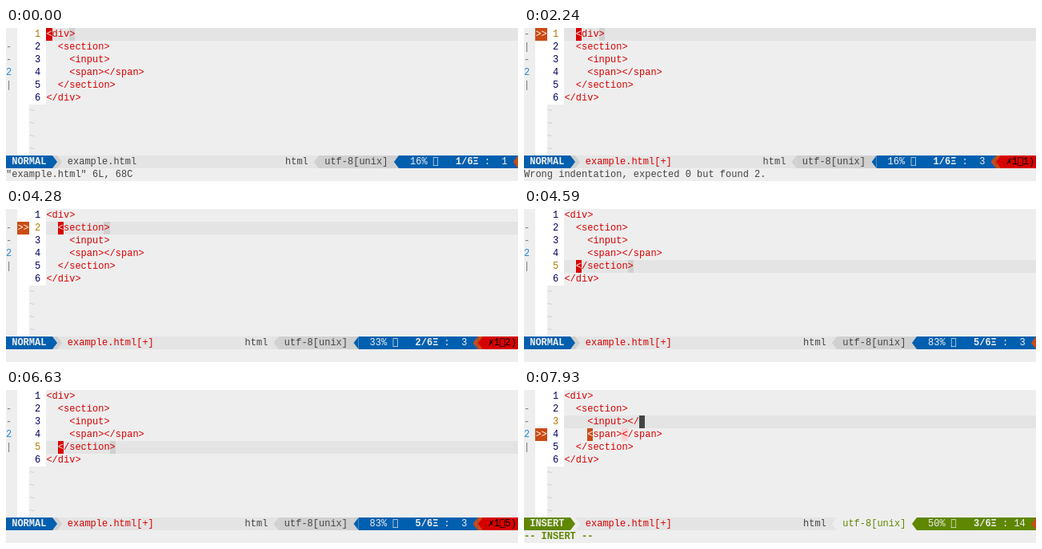
Write an HTML page that moves like this. It is 640x192 px and loops after 7.99 s.

```html
<!DOCTYPE html>
<html lang="en">
<head>
<meta charset="utf-8">
<title>Editor with live markup checks</title>
<style>
  html, body { margin: 0; width: 100%; height: 100%; overflow: hidden; background: #eee; }
  svg { display: block; width: 640px; height: 192px; }
  rect, path { shape-rendering: crispEdges; }
  text { font: 12px "Liberation Mono", "DejaVu Sans Mono", monospace; white-space: pre; }
  .b { font-weight: 700; }
  .s { font-family: "DejaVu Sans Mono", monospace; }
</style>
</head>
<body>
<svg id="screen" viewBox="0 0 640 192"></svg>
<script>
const LOOP = 7990, CW = 7.2, RH = 16, LEFT = 50.4, BAR = 160;
const RED = '#d70000', BLUE = '#005faf', GREEN = '#5f8700', ORANGE = '#cb4b16';
const INK = '#444', PAPER = '#eee', LINE = '#e4e4e4', GREY = '#d0d0d0';

const doc = ['<div>', '  <section>', '    <input>', '    <span></span>', '  </section>', '</div>'];
const edit = (row, text) => doc.map((l, i) => i === row - 1 ? text : l);
const cut = doc.filter((l, i) => i !== 4);

// Each step changes some of the editor's state from its time on.
const steps = [
  [0, { lines: doc, row: 1, col: 1, changed: false, signs: [], marks: [], err: '', msg: '"example.html" 6L, 68C', typing: false, green: false }],
  [1310, { lines: edit(1, '  <div>'), col: 3, changed: true }],
  [1440, { msg: '' }],
  [2240, { signs: [1], err: '11', msg: 'Wrong indentation, expected 0 but found 2.' }],
  [2300, { lines: doc, col: 1, msg: '' }],
  [2400, { row: 2, signs: [], err: '' }],
  [2490, { lines: edit(2, '<section>') }],
  [3090, { signs: [2] }],
  [3220, { msg: 'Wrong indentation, expected 2 but found 0.' }],
  [4220, { lines: doc, col: 3, err: '12', msg: '' }],
  [4290, { signs: [], err: '' }],
  [4370, { row: 3 }],
  [4450, { row: 4 }],
  [4520, { row: 5 }],
  [4780, { lines: cut, col: 1 }],
  [4910, { row: 2, col: 3 }],
  [5700, { signs: [2, 5], marks: [[5, 1, 'soft']], err: '32', msg: 'Unclosed element for <section> detected.' }],
  [6030, { lines: doc, row: 5, signs: [2], marks: [], err: '15', msg: '' }],
  [6630, { signs: [] }],
  [6760, { err: '' }],
  [6890, { row: 4 }],
  [7090, { col: 5 }],
  [7350, { row: 3 }],
  [7445, { col: 12, typing: true }],
  [7540, { green: true }],
  [7800, { lines: edit(3, '    <input><'), col: 13, signs: [4], marks: [[4, 5, 'hard'], [4, 11, 'soft']] }],
  [7930, { lines: edit(3, '    <input></'), col: 14 }]
];

const esc = s => s.replace(/&/g, '&amp;').replace(/</g, '&lt;');
const colX = c => LEFT + (c - 1) * CW;

function box(x, y, w, h, fill) {
  const a = Math.round(x), b = Math.round(x + w);
  return `<rect x="${a}" y="${y}" width="${b - a}" height="${h}" fill="${fill}"/>`;
}
function text(x, y, s, fill, cls = '') {
  return s ? `<text x="${x.toFixed(1)}" y="${y + 11}" fill="${fill}" class="${cls}">${esc(s)}</text>` : '';
}
// A status bar divider with its tip at x + w.
function tip(x, w, fill) {
  return `<path d="M${x} ${BAR}l${w} 8l${-w} 8z" fill="${fill}" style="shape-rendering:auto"/>`;
}
function cell(row, col, ch, bg, fg) {
  const y = (row - 1) * RH;
  return box(colX(col), y, CW, RH, bg) + text(colX(col), y, ch, fg);
}

function foldMark(lines, i) {
  const level = n => n < 0 ? 0 : lines[n].search(/\S/) / 2;
  const now = level(i);
  if (now > level(i - 1)) return '-';
  return now === 0 ? '' : now === 1 ? '|' : String(now);
}

function drawText(s) {
  const n = s.lines.length;
  let out = box(14, 0, 15, BAR, '#fff') + box(29, 0, 21, n * RH, '#fff');
  out += box(50, (s.row - 1) * RH, 590, RH, LINE);
  s.lines.forEach((line, i) => {
    const y = i * RH, fold = foldMark(s.lines, i);
    out += text(0, y, fold, fold === '2' ? '#268bd2' : '#767676');
    out += text(36, y, String(i + 1), i + 1 === s.row ? '#af7800' : '#00005f');
    out += text(LEFT, y, line, RED);
  });
  for (let i = n; i < 10; i++) out += text(28.8, i * RH, '~', GREY);
  for (const r of s.signs) {
    out += box(14, (r - 1) * RH, 15, RH, ORANGE) + text(14.4, (r - 1) * RH, '>>', '#fdf6e3');
  }
  for (const [r, c, kind] of s.marks) {
    const ch = s.lines[r - 1][c - 1];
    out += kind === 'hard' ? cell(r, c, ch, ORANGE, '#fdf6e3') : cell(r, c, ch, '#ffd0d0', RED);
  }
  const line = s.lines[s.row - 1], ch = line[s.col - 1] || ' ';
  if (ch === '<') {
    const end = line.indexOf('>', s.col);
    if (end >= 0) out += cell(s.row, end + 1, '>', GREY, RED);
  }
  return out + cell(s.row, s.col, ch, ch === ' ' ? INK : RED, PAPER);
}

function drawBar(s) {
  const main = s.green ? GREEN : BLUE, side = s.green ? PAPER : GREY;
  const n = s.lines.length, d = s.err ? -50.4 : 0;
  const put = (x, str, fill, cls) => text(x + d, BAR, str, fill, cls);
  let out = box(0, BAR, 640, RH, LINE);
  out += box(58, BAR, 6, RH, side) + tip(64, 6, side);
  out += box(0, BAR, 58, RH, main) + tip(58, 6, main);
  out += text(7.2, BAR, s.green ? 'INSERT' : 'NORMAL', PAPER, 'b');
  out += text(76.8, BAR, 'example.html' + (s.changed ? '[+]' : ''), s.changed ? RED : INK);

  out += put(349, 'html', INK);
  out += tip(391 + d, -6, side) + box(391 + d, BAR, 100, RH, side);
  out += put(398.2, 'utf-8[unix]', s.green ? GREEN : INK);
  out += tip(491 + d, -6, main) + box(491 + d, BAR, 149 - d, RH, main);
  const pct = Math.floor(100 * s.row / n) + '%';
  out += put(526.6 - pct.length * CW, pct, PAPER) + put(533.6, '\ue0a1', PAPER, 's');
  out += put(562, `${s.row}/${n}Ξ`, PAPER, 'b');
  out += put(598, ':' + String(s.col).padStart(3), PAPER);
  out += tip(640 + d, -6, ORANGE);
  if (s.err) {
    out += box(590, BAR, 6, RH, ORANGE) + tip(596, -6, RED) + box(596, BAR, 44, RH, RED);
    out += text(602.8, BAR, '✗', '#000', 's') + text(610, BAR, s.err[0], '#000');
    out += text(617, BAR, '\ue0a1', '#000', 's') + text(623.8, BAR, s.err[1] + ')', '#000');
  }
  return out;
}

function draw(s) {
  const note = s.typing ? text(0, 176, '-- INSERT --', GREEN, 'b') : text(0, 176, s.msg, INK);
  return box(0, 0, 640, 192, PAPER) + drawText(s) + drawBar(s) + note;
}

const screen = document.getElementById('screen');
const start = performance.now();
let shown = -1;

function tick() {
  const t = (performance.now() - start) % LOOP;
  const count = steps.filter(([at]) => at <= t).length;
  if (count !== shown) {
    shown = count;
    screen.innerHTML = draw(Object.assign({}, ...steps.slice(0, count).map(p => p[1])));
  }
  requestAnimationFrame(tick);
}
tick();
</script>
</body>
</html>
```
